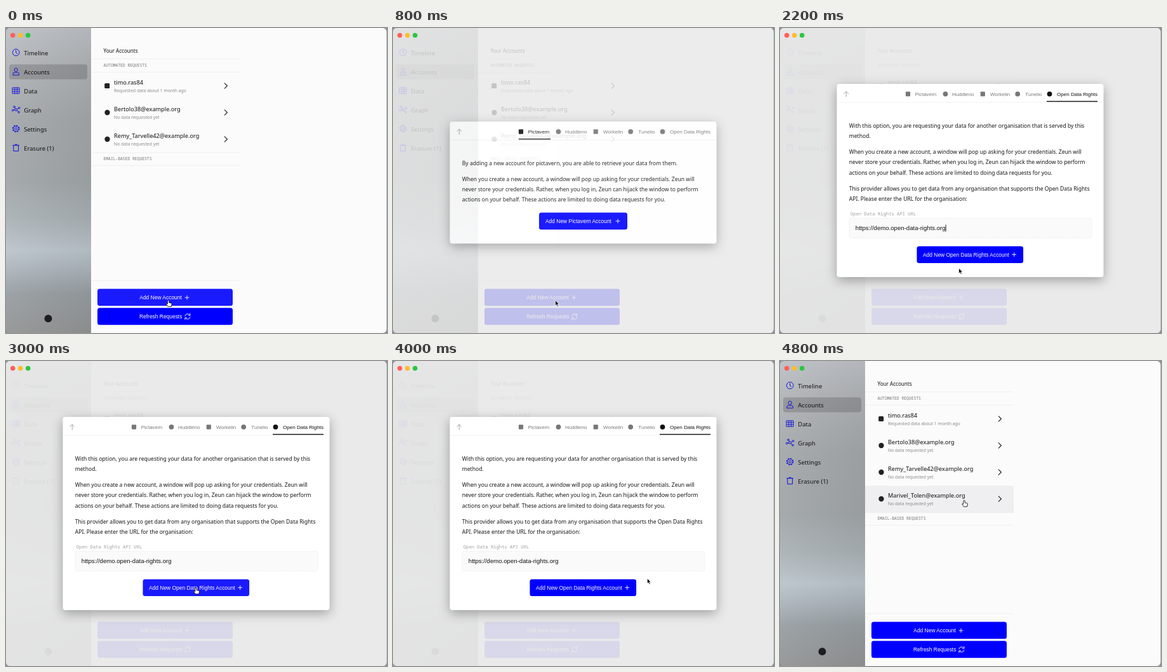
Animation, 600 px wide and 480 px high, one loop 5 s. Source, as an HTML page:

```html
<!DOCTYPE html>
<html lang="en">
<head>
<meta charset="utf-8">
<title>Adding an account</title>
<style>
  html, body { margin: 0; width: 100%; height: 100%; overflow: hidden; background: #8b8f9a; }
  svg { display: block; width: 600px; height: 480px; }
  text { white-space: pre; }
  .sans { font-family: "Noto Sans", "Open Sans", sans-serif; }
  .mono { font-family: "Noto Sans Mono", "DejaVu Sans Mono", monospace; }
  .arial { font-family: "Liberation Sans", Arial, sans-serif; }
  .inter { font-family: Inter, Roboto, sans-serif; }
  .line { fill: none; stroke-linecap: round; stroke-linejoin: round; }
</style>
</head>
<body>
<svg id="stage" viewBox="0 0 600 480" xmlns="http://www.w3.org/2000/svg"></svg>
<script>
const LOOP = 5000;
const BLUE = '#0000ff', HOVER = '#1a1aff';
const APP = 'Zeun';

// Markup helpers
const text = (x, y, str, cls, size, fill = '#111', extra = '') =>
  `<text x="${x}" y="${y}" class="${cls}" font-size="${size}" fill="${fill}" ${extra}>${str}</text>`;
const rect = (x, y, w, h, fill, r = 0, extra = '') =>
  `<rect x="${x}" y="${y}" width="${w}" height="${h}" rx="${r}" fill="${fill}" ${extra}/>`;
const dot = (x, y, r, fill, extra = '') =>
  `<circle cx="${x}" cy="${y}" r="${r}" fill="${fill}" ${extra}/>`;
const path = (d, stroke, width = 1, extra = '') =>
  `<path d="${d}" class="line" stroke="${stroke}" stroke-width="${width}" ${extra}/>`;
const plus = (x, y) => path(`M${x - 3} ${y}h6M${x} ${y - 3}v6`, '#fff', 0.9);
const rule = (y, x = 134, w = 234, fill = '#ececec') => rect(x, y, w, 0.8, fill);

function button(id, x, y, w, label, labelX, icon) {
  return rect(x, y, w, 26.6, BLUE, 3.5, `id="${id}"`) +
    text(labelX, y + 16.6, label, 'arial', 8.43, '#fff') + icon;
}

function lights(x, y, colors) {
  return colors.map((c, i) => dot(x + i * 12, y, 3.8, c)).join('');
}
const LIGHTS = ['#ff5f57', '#febc2e', '#28c840'];

// Sidebar
const navIcons = [
  dot(0, 0, 5.3, 'none') + path('M0 -3.2V0.3L2 1.8', '#1212d8'),
  dot(0, -2.6, 2.7, 'none') + path('M-4.8 5.2V3.6Q-4.8 1.6 -2.6 1.6H2.6Q4.8 1.6 4.8 3.6V5.2Z', '#1212d8'),
  path('M-5.3 -4.6H5.3V4.6H-5.3ZM-5.3 -1.8H5.3M-5.3 1.4H5.3M-1.8 -4.6V4.6M1.8 -4.6V4.6', '#1212d8', 0.9),
  dot(0, 0, 1.9, 'none') + dot(-5, 1, 1.3, 'none') + dot(-2.6, -4.4, 1.3, 'none') +
    dot(5, -2.6, 1.3, 'none') + dot(4.4, 4, 1.3, 'none') +
    path('M-3.8 .7L-1.9 .3M-2 -3.2L-1 -1.7M3.8 -2L1.7 -.9M3.4 3.1L1.4 1.3', '#1212d8', 0.9),
  dot(0, 0, 1.8, 'none') + dot(0, 0, 4.2, 'none') +
    dot(0, 0, 5.1, 'none', 'stroke-width="1.5" stroke-dasharray="2 2"'),
  path('M-5 -3.8H5M-3.9 -3.8V5.2H3.9V-3.8M-1.6 -3.8V-5.2H1.6V-3.8', '#1212d8'),
];
const navNames = ['Timeline', 'Accounts', 'Data', 'Graph', 'Settings', 'Erasure (1)'];

const sidebar = rect(0, 0, 134, 480, 'url(#sky)') + rect(0, 0, 134, 480, 'url(#shade)') +
  rect(5, 57.3, 123, 23.5, '#000', 4, 'fill-opacity=".16"') +
  navNames.map((name, i) =>
    `<g transform="translate(15.7 ${38.5 + i * 30})" stroke="#1212d8">${navIcons[i]}</g>` +
    text(28.3, 42.6 + i * 30, name, 'sans', 9.47)).join('') +
  dot(66.5, 457.3, 6, '#1d1d1f');

// Account list
function account(i, name, note, square) {
  const y = 91 + i * 42;
  const mark = square ? rect(155.2, y - 4, 8, 8, '#222', 1.5) : dot(159.5, y, 4.2, '#222');
  return mark + text(170, y - 1.6, name, 'sans', 9.2) +
    text(170, y + 9.8, note, 'sans', 6.85, '#8a8a8a') +
    path(`M344.2 ${y - 4.2}L348.4 ${y}L344.2 ${y + 4.2}`, '#222', 1.1);
}
const NONE = 'No data requested yet';
const refresh = path('M281.8 453.2A4.2 4.2 0 0 1 289.4 451.8M289.9 449.4V452.2H287.1' +
  'M290 454.8A4.2 4.2 0 0 1 282.4 456.4M281.9 458.8V456H284.7', '#fff', 0.9);

const list = rect(134, 0, 466, 480, '#fbfbfb') +
  text(153.5, 39.2, 'Your Accounts', 'sans', 8.09) + rule(48.3) +
  text(153.5, 61.3, 'AUTOMATED REQUESTS', 'mono', 6.34, '#777') + rule(69.3) +
  account(0, 'timo.ras84', 'Requested data about 1 month ago', true) +
  account(1, 'Bertolo38@example.org', NONE) +
  account(2, 'Remy_Tarvelle42@example.org', NONE) +
  `<g id="fresh">${rect(134, 196.5, 234, 42, '#efeef0', 0, 'id="freshBg"')}` +
  account(3, 'Marivel_Tolen@example.org', NONE) + '</g>' +
  `<g id="mailGroup">${rule(195.8)}${text(153.5, 208.3, 'EMAIL-BASED REQUESTS', 'mono', 6.34, '#777')}${rule(216.3)}</g>` +
  rule(397.3) +
  button('addBtn', 144, 410.6, 213, 'Add New Account', 210.3, plus(285, 424.2)) +
  button('refreshBtn', 144, 440.6, 213, 'Refresh Requests', 210, refresh);

// Dialog; its own origin is the top edge
const tabs = [
  ['Pictavern', 201.5, 212.7], ['Huddleno', 260.5, 271], ['Workelin', 319.3, 331],
  ['Tunelio', 374.2, 386.3], ['Open Data Rights', 424.5, 436],
];
const header = path('M104.3 20V12M100.8 15.4L104.3 11.9L107.8 15.4', '#a5a5a5') +
  rule(28.6, 90, 419, '#eeeeee') +
  tabs.map(([name, ix, tx], i) => `<g id="tab${i}">` +
    (i === 0 || i === 2 ? rect(ix - 3.6, 12.2, 7.2, 7.2, 'currentColor', 1) : dot(ix, 15.8, 3.9, 'currentColor')) +
    text(tx, 18.5, name, 'arial', 8.07, 'currentColor') + '</g>').join('') +
  rect(198, 26.8, 50, 1.4, '#111', 0, 'id="underline"');

const para = (lines, ys) =>
  lines.map((s, i) => text(108.8, ys[i], s, 'sans', 8.55, '#161616')).join('');
const popInfo = [
  `When you create a new account, a window will pop up asking for your credentials. ${APP} will`,
  `never store your credentials. Rather, when you log in, ${APP} can hijack the window to perform`,
  'actions on your behalf. These actions are limited to doing data requests for you.',
];
const bodyA = para([
  'By adding a new account for pictavern, you are able to retrieve your data from them.', ...popInfo],
  [68.5, 93.5, 109.7, 126]) +
  button('btnA', 230, 143.3, 139, 'Add New Pictavern Account', 240, plus(354, 156.6));
const bodyB = para([
  'With this option, you are requesting your data for another organisation that is served by this',
  'method.', ...popInfo,
  'This provider allows you to get data from any organisation that supports the Open Data Rights',
  'API. Please enter the URL for the organisation:'],
  [68.5, 84.8, 110, 126.2, 142.5, 167.5, 183.8]) +
  text(110.8, 206.6, 'Open Data Rights API URL', 'mono', 7.2, '#a0a0a0') +
  rect(109, 211.5, 382, 31, '#fafafa', 2, 'stroke="#e6e6e6" stroke-width=".8" stroke-dasharray="1.5 1.5"') +
  text(118.8, 230.2, '', 'arial', 9.6, '#111', 'id="url"') + rect(0, 221.5, 0.9, 11, '#111', 0, 'id="caret"') +
  button('btnB', 215.5, 255.5, 167.6, 'Add New Open Data Rights Account', 225, plus(368.7, 268.6));

const overlay = '<g id="overlay">' + rect(0, 0, 600, 480, '#e9e9e9', 0, 'fill-opacity=".93"') +
  '<g id="dialog">' +
  rect(89.5, 0, 420, 192, '#fff', 4, 'id="panel" style="filter:drop-shadow(0 5px 9px rgba(0,0,0,.32))"') +
  header + `<g id="bodyA">${bodyA}</g><g id="bodyB">${bodyB}</g></g></g>`;

// Authorization window
const big = (y, str) => text(250, y, str, 'inter', 28, '#050505', 'font-weight="700" letter-spacing="-1.4"');
const popup = '<g id="popup">' +
  rect(205.8, 103, 334.6, 359.6, '#ebebeb', 5, 'style="filter:drop-shadow(0 8px 13px rgba(0,0,0,.5))"') +
  path('M205.8 119V108Q205.8 103 210.8 103H535.4Q540.4 103 540.4 108V119Z', 'none', 0, 'style="fill:#e6e4e6"') +
  rule(118.8, 205.8, 334.6, '#d6d4d6') + lights(213.6, 111, LIGHTS) +
  text(372.4, 113.8, 'Open Data Rights API Authorization Demo', 'inter', 7.9, '#3b3b3b', 'font-weight="600" text-anchor="middle"') +
  rect(219.6, 126, 306.4, 300, '#fff', 9, 'style="filter:drop-shadow(0 2px 5px rgba(0,0,0,.16))"') +
  big(182, 'You are about to') +
  big(212, `give <tspan font-style="italic" font-weight="600">${APP}</tspan> access`) +
  big(242, 'to your data') +
  text(249.8, 286, `You are giving access to ${APP} for the following`, 'inter', 10.85, '#333') +
  text(249.8, 300, 'purposes:', 'inter', 10.85, '#333') +
  dot(264.3, 321.4, 1.7, '#333') +
  text(273.8, 325, 'performing data requests on your behalf', 'inter', 10.85, '#333') +
  rect(305.4, 365.6, 134.8, 30.4, BLUE, 4, 'id="giveBtn" style="filter:drop-shadow(0 3px 4px rgba(0,0,255,.3))"') +
  text(372.8, 384.8, `Give ${APP} access`, 'inter', 11.2, '#fff', 'font-weight="600" text-anchor="middle"') +
  '<g clip-path="url(#popClip)">' + dot(352.3, 459.3, 4.6, '#3a3a3a') +
  text(364, 461.4, 'Open <tspan font-weight="700" dx="-1.4">Data</tspan>', 'inter', 8.3, '#444') + '</g></g>';

const cursor = '<g id="cursor">' +
  '<path id="arrow" d="M0 0V8.4L1.9 6.7L3.3 9.8L4.8 9.1L3.4 6.1H6Z" fill="#000" stroke="#fff" stroke-width=".8"/>' +
  '<path id="hand" d="M0 0C.8 0 1.2.5 1.2 1.2V3.7L4.4 4.3Q5.7 4.6 5.5 5.9L4.7 9.8H-.5L-3 6.5C-3.6 5.5-2.5 4.7-1.8 5.4L-1.2 6V1.2C-1.2.5-.8 0 0 0Z" fill="#fff" stroke="#111" stroke-width=".9"/></g>';

const stops = list => list.map(([o, c]) => `<stop offset="${o}" stop-color="${c}"/>`).join('');
const defs = `<defs>
  <linearGradient id="sky" x1="0" y1="0" x2="0" y2="1">${stops([
    [0, '#bcc0c5'], [0.12, '#b0b3b6'], [0.3, '#a3a7aa'], [0.5, '#a0a5a8'], [0.62, '#a9b0b4'],
    [0.73, '#bac4ca'], [0.8, '#a9b2b8'], [0.87, '#979da1'], [1, '#929494']])}</linearGradient>
  <linearGradient id="shade">
    <stop offset="0" stop-color="#fff" stop-opacity=".06"/>
    <stop offset="1" stop-color="#000" stop-opacity=".05"/></linearGradient>
  <clipPath id="win"><rect width="599.3" height="480" rx="6"/></clipPath>
  <clipPath id="popClip"><rect x="206" y="440" width="334" height="22.4"/></clipPath>
</defs>`;

document.getElementById('stage').innerHTML = defs +
  `<g clip-path="url(#win)">${list}${sidebar}${overlay}` +
  `<g id="lit">${lights(10.7, 11.5, LIGHTS)}</g>` +
  `<g id="unlit" stroke="#bdbdbd" stroke-width=".6">${lights(10.7, 11.5, ['#d2d2d2', '#d2d2d2', '#d2d2d2'])}</g></g>` +
  popup + cursor;

const $ = {};
document.querySelectorAll('#stage [id]').forEach(n => { $[n.id] = n; });
const set = (id, key, val) => $[id].setAttribute(key, val);
const show = (id, on) => set(id, 'visibility', on ? 'visible' : 'hidden');

// Timing
const URL_TEXT = 'https://demo.open-data-rights.org';
const within = (t, a, b) => t >= a && t < b;
const ramp = (t, a, b) => Math.min(1, Math.max(0, (t - a) / (b - a)));
const easeOut = p => 1 - (1 - p) ** 2;
const easeBoth = p => p * p * (3 - 2 * p);

// Pointer moves: start, end, x, y
const moves = [
  [0, 1, 255.6, 428.6], [1210, 1380, 452.2, 153.6], [1620, 1760, 296, 314], [2000, 2100, 281.6, 378],
  [2240, 2380, 299, 357], [3420, 3580, 370.6, 379.2], [3880, 4160, 445.2, 286], [4260, 4600, 290, 219.4],
];
function pointer(t) {
  let [, , x, y] = moves[0];
  for (const [a, b, tx, ty] of moves) {
    const p = easeBoth(ramp(t, a, b));
    x += (tx - x) * p;
    y += (ty - y) * p;
  }
  return [x, y];
}

function draw(t) {
  const enter = easeOut(ramp(t, 500, 950));
  const leave = easeOut(ramp(t, 4130, 4530));
  const second = t >= 1540;
  const popped = within(t, 3400, 3800);
  const added = t >= 3800;

  set('overlay', 'opacity', enter * (1 - leave));
  show('overlay', enter > 0 && leave < 1);
  set('dialog', 'transform', `translate(0 ${(second ? 88 : 144) + 30 * (1 - enter) - 15 * leave})`);
  set('panel', 'height', second ? 304 : 192);
  $.bodyA.style.display = second ? 'none' : '';
  $.bodyB.style.display = second ? '' : 'none';
  set('underline', 'x', second ? 420 : 198);
  set('underline', 'width', second ? 80 : 50);
  tabs.forEach((_, i) => set('tab' + i, 'color', i === (second ? 4 : 0) ? '#111' : '#777'));

  const typed = Math.floor(URL_TEXT.length * ramp(t, 1710, 1990));
  $.url.textContent = URL_TEXT.slice(0, typed);
  $.caret.style.display = within(t, 1700, 2400) ? '' : 'none';
  set('caret', 'x', 118.8 + (typed && second ? $.url.getComputedTextLength() : 0));

  $.popup.style.display = popped ? '' : 'none';
  show('lit', !popped);
  show('unlit', popped);
  $.fresh.style.display = added ? '' : 'none';
  set('mailGroup', 'transform', `translate(0 ${added ? 42 : 0})`);

  const overRow = t >= 4540;
  set('freshBg', 'fill', overRow ? '#efeef0' : '#fbfbfb');
  set('addBtn', 'fill', t < 600 ? HOVER : BLUE);
  set('btnB', 'fill', within(t, 2350, 3400) ? HOVER : BLUE);
  const overGive = within(t, 3550, 3800);
  set('giveBtn', 'fill', overGive ? '#0000b4' : BLUE);

  const hand = t < 600 || within(t, 1370, 1640) || within(t, 2350, 3400) || overGive || overRow;
  const [x, y] = pointer(t);
  set('cursor', 'transform', `translate(${x} ${y})`);
  $.cursor.style.display = within(t, 1710, 2100) ? 'none' : '';
  show('hand', hand);
  show('arrow', !hand);
}

const begin = performance.now();
function tick() {
  draw((performance.now() - begin) % LOOP);
  requestAnimationFrame(tick);
}
tick();
</script>
</body>
</html>
```
